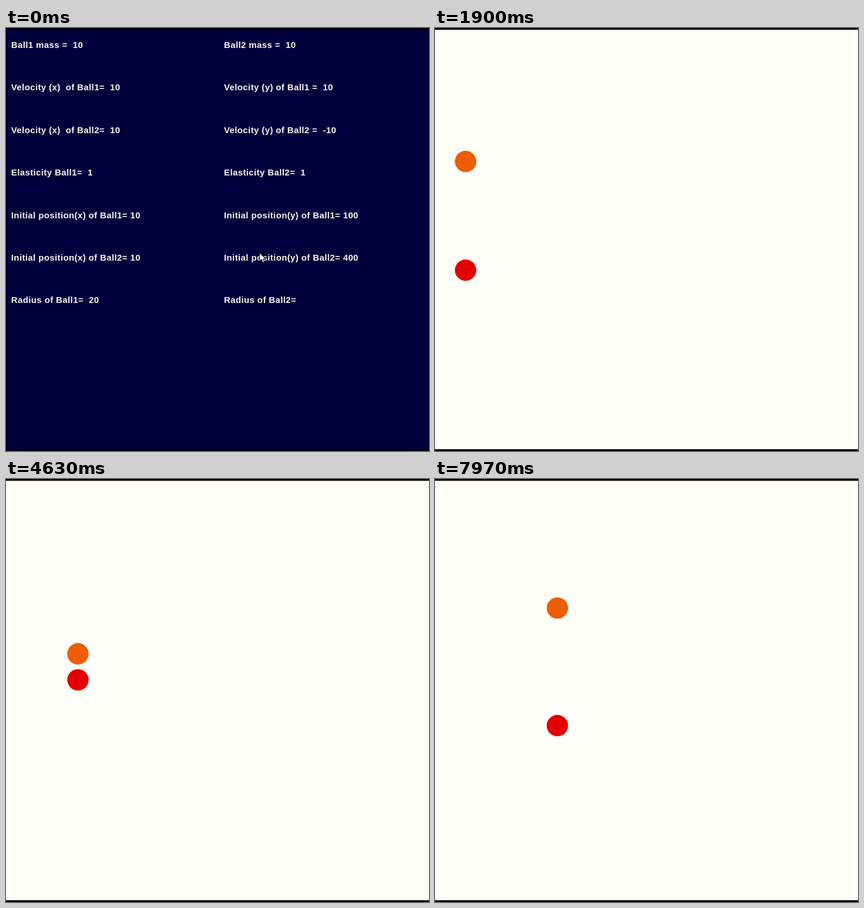
An HTML page with a canvas that plays this animation: 720 px wide and 720 px high, repeating every 8000 ms.

```html
<!DOCTYPE html>
<html lang="en">
<head>
<meta charset="utf-8">
<title>Two ball collision</title>
<style>
  html, body { margin: 0; width: 100%; height: 100%; overflow: hidden; background: #000; }
  canvas { display: block; width: 100vw; height: 100vh; }
</style>
</head>
<body>
<canvas id="stage" width="720" height="720"></canvas>
<script>
const ctx = document.getElementById('stage').getContext('2d');
const LOOP = 8000, STEP = 100 / 3;
const START = 200;        // the form gives way to the simulation
const IMPACT = 4786;      // the balls touch
const SPEED = 0.02575;    // px per ms on each axis
const MIDDLE = 319.7, RADIUS = 18.2;

const rows = [
  ['Ball1 mass =  10', 'Ball2 mass =  10'],
  ['Velocity (x)  of Ball1=  10', 'Velocity (y) of Ball1 =  10'],
  ['Velocity (x)  of Ball2=  10', 'Velocity (y) of Ball2 =  -10'],
  ['Elasticity Ball1=  1', 'Elasticity Ball2=  1'],
  ['Initial position(x) of Ball1= 10', 'Initial position(y) of Ball1= 100'],
  ['Initial position(x) of Ball2= 10', 'Initial position(y) of Ball2= 400'],
  ['Radius of Ball1=  20', 'Radius of Ball2=  ']
];

function background(color) {
  ctx.fillStyle = '#000';
  ctx.fillRect(0, 0, 720, 720);
  ctx.fillStyle = color;
  ctx.fillRect(0, 3, 720, 714);
}

function drawForm(t) {
  background('#00003c');
  ctx.fillStyle = '#f6f6f0';
  ctx.font = 'bold 15px "Liberation Sans", Arial, sans-serif';
  ctx.letterSpacing = '0.38px';
  const typed = t < 60 ? '' : t < 125 ? '2' : '20';
  rows.forEach(([left, right], i) => {
    const y = 34 + i * 72.4;
    ctx.fillText(left, 8.8, y);
    ctx.fillText(i === 6 ? right + typed : right, 371, y);
  });
}

function drawBall(x, y, color) {
  ctx.beginPath();
  ctx.arc(x, y, RADIUS, 0, Math.PI * 2);
  ctx.fillStyle = color;
  ctx.fill();
}

function drawSimulation(t) {
  background('#fffffa');
  const x = 30.7 + SPEED * (t - 1070);
  const gap = RADIUS + SPEED * Math.abs(t - IMPACT);
  drawBall(x, MIDDLE - gap, '#ee5d00');
  drawBall(x, MIDDLE + gap, '#e40000');
}

// The pointer rests, then sweeps off the lower left edge.
function drawPointer(t) {
  if (t > 1320) return;
  const s = Math.max(0, t - 760);
  const x = 431 - 0.847 * s;
  const y = 382 + 0.325 * s + 0.00033 * s * s;
  ctx.save();
  ctx.translate(x, y);
  ctx.beginPath();
  [[0.5, 0.5], [0.5, 15], [3.8, 12], [6.2, 17.5], [8.6, 16.4], [6.3, 11.2], [11, 11]]
    .forEach(([px, py]) => ctx.lineTo(px, py));
  ctx.closePath();
  ctx.fillStyle = '#fffffa';
  ctx.fill();
  ctx.strokeStyle = t < START - 1 ? '#14142c' : '#70706c';
  ctx.lineWidth = 1.1;
  ctx.stroke();
  ctx.restore();
}

function frame() {
  const now = performance.now() % LOOP;
  const t = Math.floor((now + 5) / STEP) % 240 * STEP;
  (t < START - 1 ? drawForm : drawSimulation)(t);
  drawPointer(t);
  requestAnimationFrame(frame);
}
frame();
</script>
</body>
</html>
```
